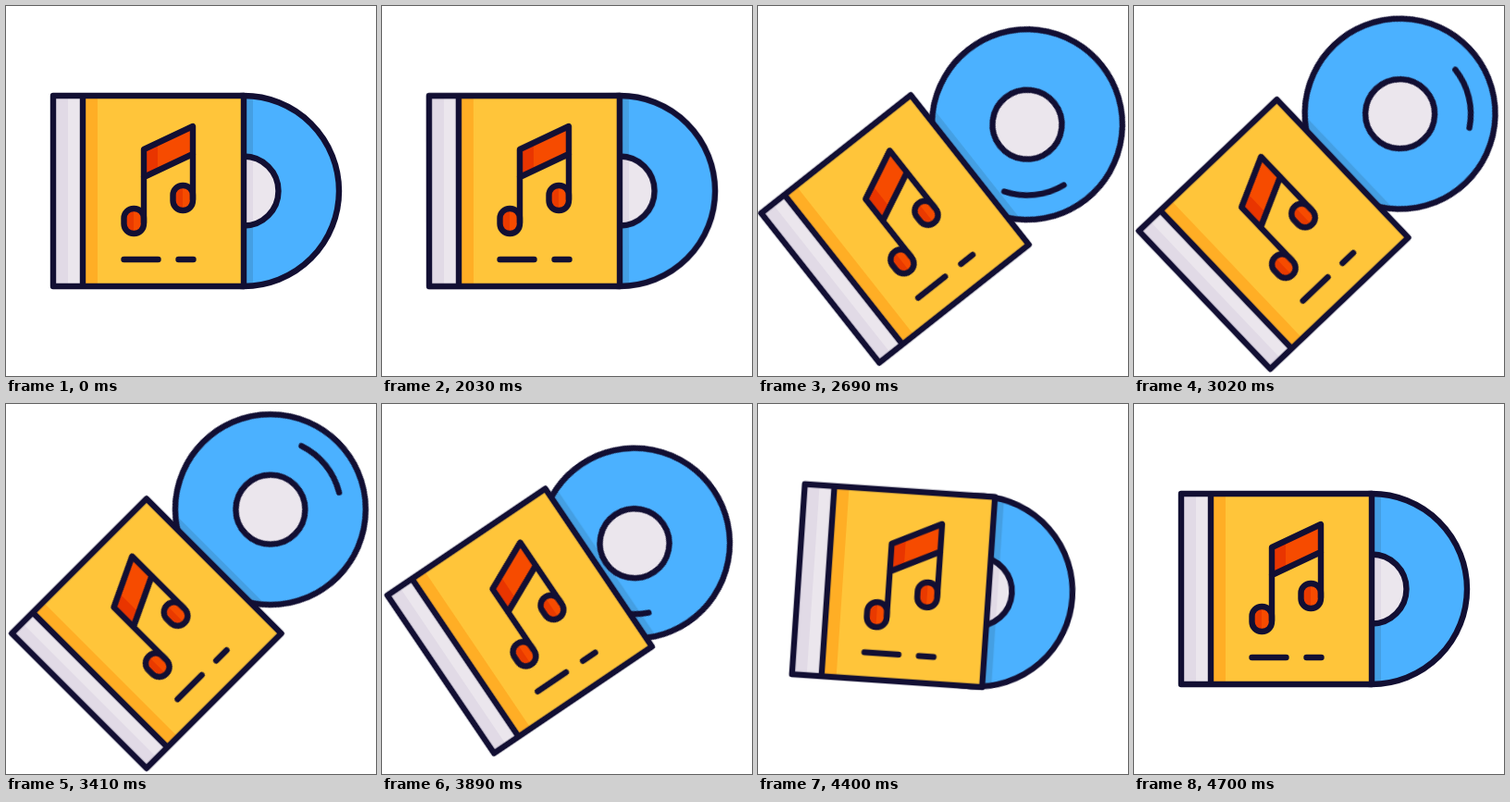
Recreate the animation shown at these times as an HTML page. Size 400 by 400 pixels, loop 4730 ms.

```html
<!DOCTYPE html>
<html lang="en">
<head>
<meta charset="utf-8">
<title>Music disc</title>
<style>
  html, body { margin: 0; width: 100%; height: 100%; overflow: hidden; background: #fff; }
  svg { display: block; width: 100vw; height: 100vh; }
  .line { fill: none; stroke: #120f33; stroke-width: 6.4; stroke-linecap: round; stroke-linejoin: round; }
  .tilt, .case, .disc, .spin { animation: 4730ms infinite linear; }
  .tilt { animation-name: tilt; transform-origin: 200px 200px; }
  .case { animation-name: case; }
  .disc { animation-name: disc; }
  .spin { animation-name: spin; transform-origin: 257px 200px; }

  /* 42.28% = 2.0 s, 67.65% = 3.2 s, 71.88% = 3.4 s, 99.37% = 4.7 s */
  @keyframes tilt {
    0% { transform: rotate(0deg); }
    42.28% { transform: rotate(0deg); animation-timing-function: cubic-bezier(.42, 0, .01, 1); }
    71.88% { transform: rotate(-45deg); animation-timing-function: cubic-bezier(.72, 0, .32, 1.45); }
    99.37%, 100% { transform: rotate(0deg); }
  }
  @keyframes case {
    0% { transform: translateX(0); }
    42.28% { transform: translateX(0); animation-timing-function: cubic-bezier(.333, 0, 0, 1); }
    67.65% { transform: translateX(-22px); }
    71.88% { transform: translateX(-22px); animation-timing-function: cubic-bezier(.333, 0, .667, 1); }
    87.95% { transform: translateX(-13.2px); animation-timing-function: cubic-bezier(.333, 0, .667, 1); }
    99.37%, 100% { transform: translateX(0); }
  }
  @keyframes disc {
    0% { transform: translateX(0); }
    42.28% { transform: translateX(0); animation-timing-function: cubic-bezier(.333, 0, 0, 1); }
    67.65% { transform: translateX(64.5px); }
    71.88% { transform: translateX(64.5px); animation-timing-function: cubic-bezier(.72, 0, .8, 1); }
    89.01% { transform: translateX(-30px); animation-timing-function: cubic-bezier(.333, 0, .667, 1); }
    99.37%, 100% { transform: translateX(0); }
  }
  @keyframes spin {
    0% { transform: rotate(186deg); }
    42.28% { transform: rotate(186deg); animation-timing-function: cubic-bezier(.42, 0, .16, 1); }
    71.88% { transform: rotate(-354deg); animation-timing-function: cubic-bezier(.72, 0, .32, 1.45); }
    99.37%, 100% { transform: rotate(186deg); }
  }
</style>
</head>
<body>
<svg viewBox="0 0 400 400">
  <clipPath id="round"><circle class="disc" cx="257" cy="200" r="103"/></clipPath>
  <clipPath id="hole"><circle class="disc" cx="257" cy="200" r="37.5"/></clipPath>
  <g class="tilt">
    <g class="disc">
      <circle cx="257" cy="200" r="103" fill="#4bb1ff"/>
      <circle cx="257" cy="200" r="37.5" fill="#ebe6ed"/>
    </g>
    <g clip-path="url(#round)">
      <rect class="case" x="250" y="97" width="17" height="206" fill="#449fe3"/>
    </g>
    <g clip-path="url(#hole)">
      <circle class="disc" cx="257" cy="200" r="37.5" fill="#ebe6ed"/>
      <rect class="case" x="250" y="97" width="17" height="206" fill="#e1dae6"/>
    </g>
    <g class="disc">
      <circle class="line" cx="257" cy="200" r="103"/>
      <circle class="line" cx="257" cy="200" r="37.5"/>
      <path class="line spin" d="M326.3 167.7A76.5 76.5 0 0 1 326.3 232.3"/>
    </g>
    <g class="case">
      <path fill="#ffc53a" d="M83 97H257V303H83z"/>
      <path fill="#ffae25" d="M83 97H99V303H83z"/>
      <path fill="#ebe6ed" d="M51 97H83V303H51z"/>
      <path fill="#e1dae6" d="M51 97H67V303H51z"/>
      <path class="line" d="M51 97H257V303H51zM83 97V303"/>
      <path fill="#f64b00" d="M149 155L202 130V160L149 185z"/>
      <path fill="#e93500" d="M149 155L164 148V178L149 185z"/>
      <g id="head">
        <rect x="127.5" y="219" width="21.5" height="27" rx="10.5" fill="#f64b00"/>
        <path fill="#e93a00" d="M138 219A10.5 10.5 0 0 0 127.5 229.5V235.5A10.5 10.5 0 0 0 138 246z"/>
        <rect class="line" x="127.5" y="219" width="21.5" height="27" rx="10.5"/>
      </g>
      <use href="#head" x="53" y="-25"/>
      <path class="line" d="M149 234V155L202 130V209M149 185L202 160M127.5 274H164.5M186.5 274H202.5"/>
    </g>
  </g>
</svg>
</body>
</html>
```
